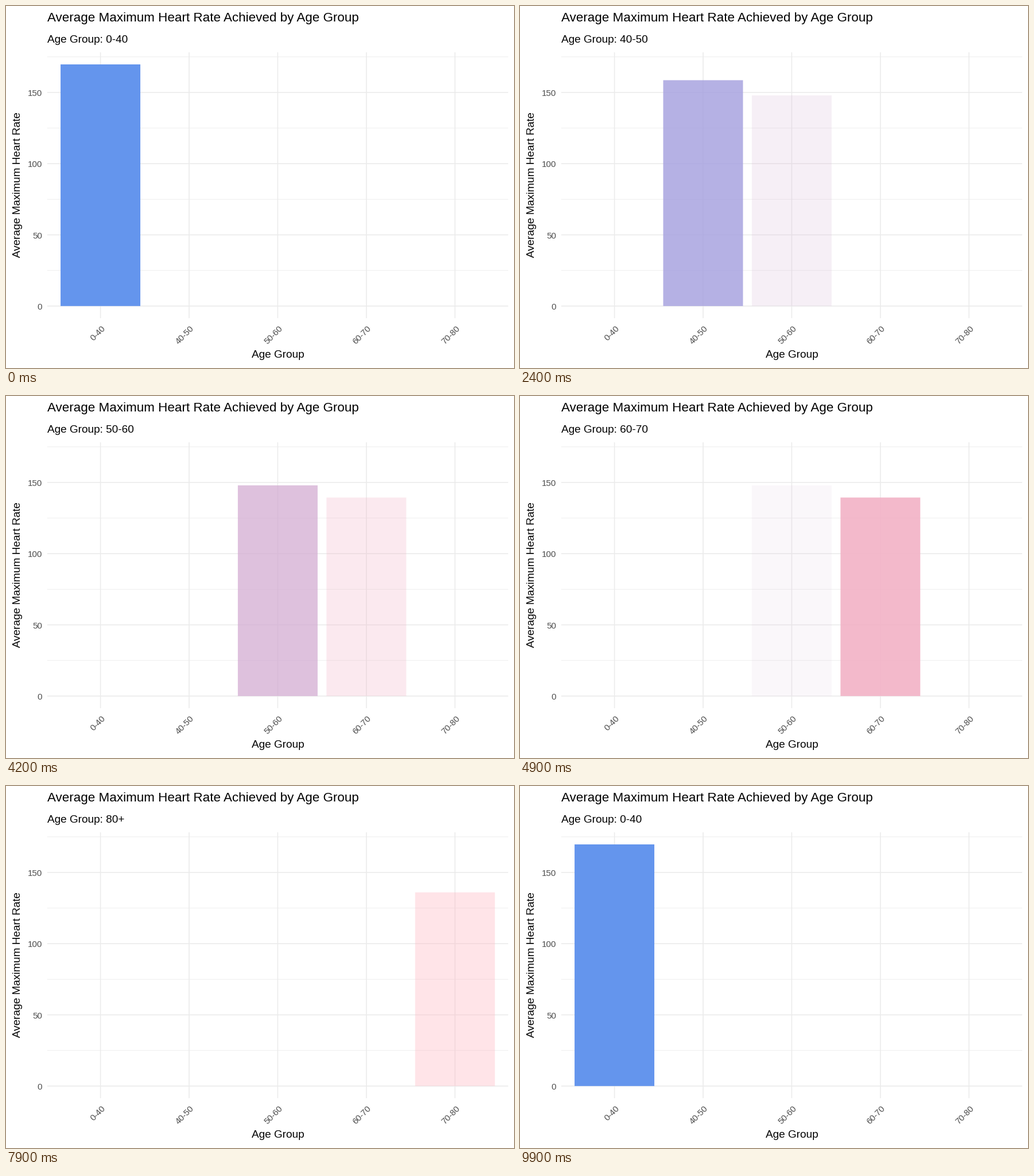
Write a matplotlib script that moves like this. It is 885 px wide and 632 px high and loops after 10 s.

```python
import matplotlib.pyplot as plt
from matplotlib.animation import FuncAnimation
from matplotlib.patches import Rectangle

W, H, DPI = 885, 632, 100
FRAMES, INTERVAL = 100, 100

LEFT, RIGHT, TOP, BOTTOM = 71.9, 874.9, 80.8, 545.0
ZERO, UNIT = 523.82, 2.486
STEP = (RIGHT - LEFT) / 5.2

GROUPS = ["0-40", "40-50", "50-60", "60-70", "70-80", "80+"]
RATES = [169.7, 158.6, 147.95, 139.4, 136.0]
COLORS = ["#6495ED", "#A5A0DF", "#D2AAD1", "#F2B2C6", "#FFB6C1"]

# Per transition: first frame, length, frame at which the subtitle switches
FADES = [(5, 11, 12), (22, 11, 29), (39, 11, 46),
         (55, 11, 62), (72, 11, 79), (89, 10, 95)]

plt.rcParams["font.family"] = "Liberation Sans"
fig = plt.figure(figsize=(W / DPI, H / DPI), dpi=DPI, facecolor="white")
ax = fig.add_axes([0, 0, 1, 1])
ax.set(xlim=(0, W), ylim=(H, 0))
ax.axis("off")


def points(px):
    return px * 72 / DPI


def center(i):
    return LEFT + STEP * (0.6 + i)


def level(rate):
    return ZERO - UNIT * rate


def rule(xs, ys, width):
    ax.plot(xs, ys, color="#EBEBEB", lw=points(width), snap=False,
            solid_capstyle="butt", zorder=1)


def label(x, y, text, size, color="black", **kw):
    return ax.text(x, y, text, fontsize=points(size), color=color,
                   va="baseline", rotation_mode="anchor", **kw)


for rate in range(25, 176, 50):
    rule([LEFT, RIGHT], [level(rate)] * 2, 0.8)

for rate in range(0, 151, 50):
    rule([LEFT, RIGHT], [level(rate)] * 2, 1.6)
    label(63.3, level(rate) + 6.2, str(rate), 15, "#4D4D4D", ha="right")

bars = []
for i, (rate, color) in enumerate(zip(RATES, COLORS)):
    x = center(i)
    rule([x, x], [TOP, BOTTOM], 1.6)
    label(x + 9, 563.5, GROUPS[i], 15, "#4D4D4D", ha="right", rotation=45)
    bar = Rectangle((x - 0.45 * STEP, level(rate)), 0.9 * STEP, UNIT * rate,
                    facecolor=color, linewidth=0, snap=False, zorder=2)
    bars.append(ax.add_patch(bar))

label(71.5, 27.5, "Average Maximum Heart Rate Achieved by Age Group", 22.4)
subtitle = label(71.5, 64, "", 19.05)
label((LEFT + RIGHT) / 2, 614, "Age Group", 19.05, ha="center")
label(25, 312.5, "Average Maximum Heart Rate", 19.05,
      ha="center", rotation=90)


def progress(frame, fade):
    start, length, _ = fade
    return min(max((frame - start) / length, 0), 1)


def draw(frame):
    done = [progress(frame, fade) for fade in FADES]
    for i, bar in enumerate(bars):
        # The first group starts visible and returns in the last transition
        alpha = 1 - done[0] + done[-1] if i == 0 else done[i - 1] - done[i]
        bar.set_alpha(min(max(alpha, 0), 1))
    passed = sum(frame >= switch for _, _, switch in FADES)
    subtitle.set_text("Age Group: " + GROUPS[passed % len(GROUPS)])
    return bars + [subtitle]


anim = FuncAnimation(fig, draw, frames=FRAMES, interval=INTERVAL,
                     repeat=True, repeat_delay=0, blit=False)
plt.show()
```
